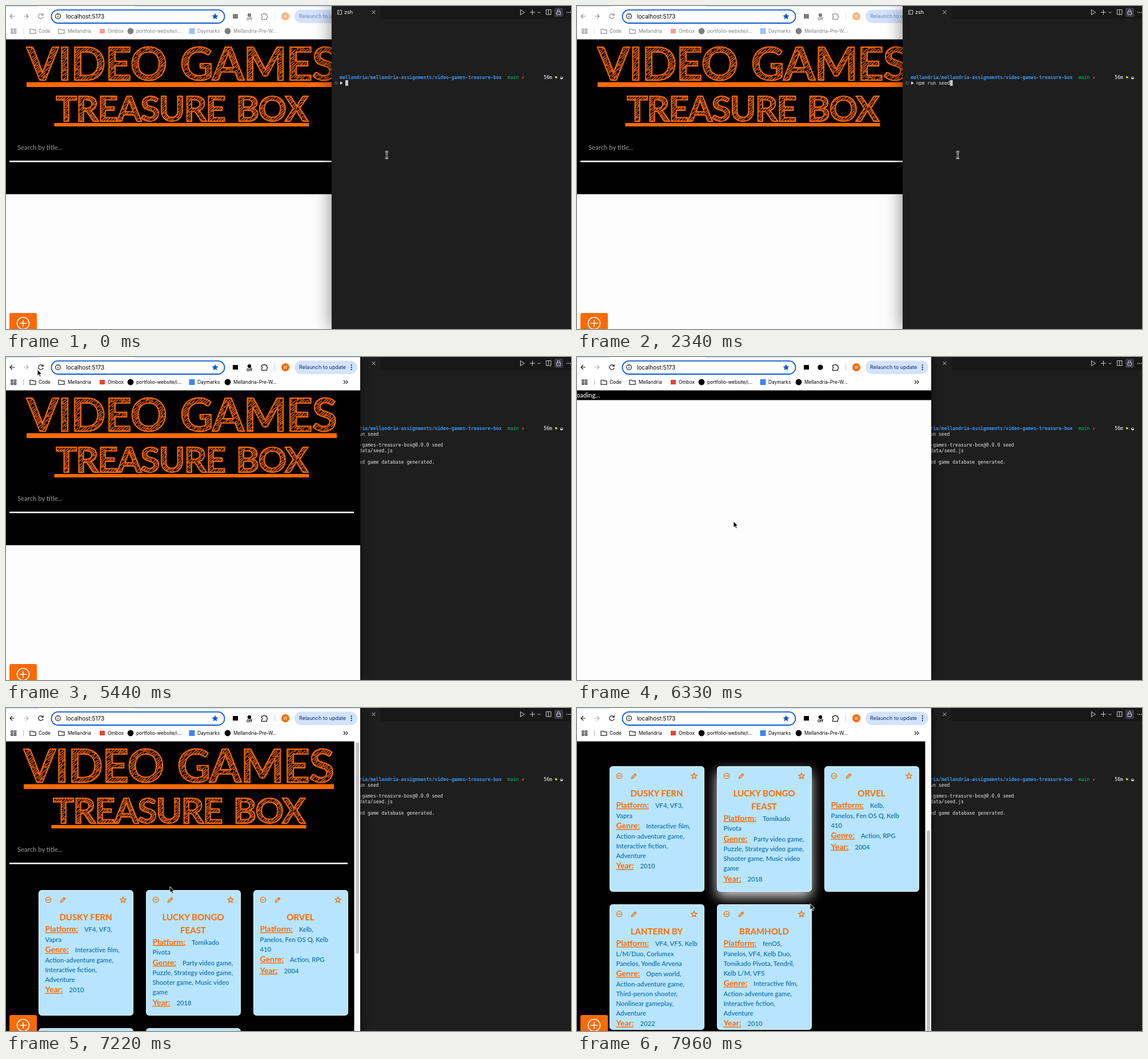
Write an HTML page that moves like this. It is 989 px wide and 566 px high and loops after 8 s.

```html
<!DOCTYPE html>
<html lang="en">
<head>
<meta charset="utf-8">
<title>Video Games Treasure Box</title>
<style>
  html, body { margin: 0; width: 100%; height: 100%; overflow: hidden; background: #1e1e1e; }
  .stage { position: relative; width: 989px; height: 566px; overflow: hidden; }
  svg { position: absolute; top: 0; }
  text { white-space: pre; }
  #web { left: 0; background: #fff; font: 8.3px Inter, sans-serif; color: #1f1f1f; z-index: 1; }
  #term { left: 570px; background: #1e1e1e; box-shadow: 0 0 30px rgba(0, 0, 0, .5); z-index: 2;
          font: 8.134px "DejaVu Sans Mono", monospace; fill: #e5e5e5; }
  #mouse { left: 0; z-index: 4; }
  .front #web { z-index: 3; box-shadow: 0 0 14px rgba(0, 0, 0, .5); }
  .dim { opacity: .5; }
  .front .dim { opacity: 1; }
  .front .off-state { opacity: .35; }
  .line { fill: none; stroke: currentColor; stroke-width: 1.2; }
  .ui { fill: none; stroke: #ccc; stroke-width: 1; }
  .page { font: 500 11.3px Lato, sans-serif; }
  .sketch { font-weight: 700; text-anchor: middle; fill: url(#hatch); stroke: #ff6a00; stroke-width: 2; }
  .orange { fill: #ff6a00; }
  .edge { fill: none; stroke: #ff6a00; stroke-width: 1.4; }
  .card { fill: #b7e5ff; stroke: #e9f7ff; }
  .glow { fill: #b7e5ff; filter: drop-shadow(0 10px 11px #fff); }
  .name { font-size: 15px; font-weight: 700; text-anchor: middle; fill: #ff6a00; }
  .label { font-size: 14px; font-weight: 700; fill: #ff6a00; text-decoration: underline; }
  .info { fill: #0767a8; }
</style>
</head>
<body>
<div class="stage" id="stage">

  <svg id="web" width="620" height="566">
    <defs>
      <pattern id="hatch" width="17" height="13" patternUnits="userSpaceOnUse" patternTransform="rotate(-40)">
        <path d="M0 1.2h17M0 4.600l12-.8M2 7.100l15 .4M0 9.300h9M6 11.400l11-.5" stroke="#ff6a00" stroke-width="1.5"/>
      </pattern>
      <clipPath id="view"><path d="M0 58h620v508H0z"/></clipPath>
      <path id="folder" class="line" d="M-5-3.5h4l1.2 1.3H5v6.3H-5z"/>
      <g id="tools" class="edge">
        <circle cx="17" cy="17" r="4.6"/><path d="M14.5 17h5"/>
        <path d="M38.5 21.5l.8-2.8 5.4-5.4 2 2-5.4 5.4zM43.4 14.6l2 2"/>
      </g>
    </defs>

    <path fill="#d3e3fd" d="M0 0h57v1.5H0zM226 0h394v1.5H226z"/>
    <rect x="79.5" y="6.8" width="303" height="23.2" rx="11.6" fill="#fff" stroke="#0b57d0" stroke-width="1.8"/>
    <circle class="line" cx="91" cy="18" r="4.4"/>
    <path class="line" d="M91 17.3v3M91 15v1.2"/>
    <text x="105" y="21.8" font-size="10">localhost:5173</text>
    <polygon id="fav" fill="#0b57d0"/>

    <g class="dim">
      <path class="line" d="M15 18H7M11 14l-4 4 4 4M64.3 15.3A4.2 4.2 0 1 0 65 19M65.2 13v3.2H62"/>
      <path class="line off-state" d="M31 18h8M35 14l4 4-4 4"/>
      <path d="M397 14h9v8h-9z"/>
      <circle id="ext" cx="426"/>
      <text id="badge" x="426" y="25.3" font-size="6.6" font-weight="700" text-anchor="middle">Off</text>
      <path class="line" d="M447.5 14.3h3a1.5 1.5 0 0 1 3 0h3v3a1.5 1.5 0 0 1 0 3v3h-9v-3a1.5 1.5 0 0 0 0-3z"/>
      <path d="M470 12.5h1v11h-1z" fill="#a8c7fa"/>
      <circle cx="489" cy="18" r="7" fill="#ef6c00"/>
      <text x="489" y="20.6" font-size="7" text-anchor="middle" fill="#fff">W</text>
    </g>
    <rect x="505" y="6.5" width="110" height="23.5" rx="11.7" fill="#d3e3fd"/>
    <g class="dim">
      <text x="513" y="21.3" font-size="9" fill="#0a2a66">Relaunch to update</text>
      <path d="M603.7 13.2h2v2h-2zm0 3.8h2v2h-2zm0 3.8h2v2h-2z" fill="#0a2a66"/>
      <path class="line" d="M9 40h3v3H9zM14.5 40h3v3h-3zM9 45.2h3v3H9zM14.5 45.2h3v3h-3z"/>
      <path d="M30 39h1v10h-1z" fill="#bbb"/>
      <use href="#folder" x="47" y="44"/><text x="57" y="47">Code</text>
      <use href="#folder" x="97" y="44"/><text x="108" y="47">Mellandria</text>
      <path d="M164 40h9v8h-9z" fill="#ea4335"/><text x="178" y="47">Ombox</text>
      <circle cx="218" cy="44" r="5.4"/><text x="228" y="47">portfolio-website/i...</text>
      <path d="M320.5 39h10v10h-10z" fill="#4285f4"/><text x="335" y="47">Daymarks</text>
      <circle cx="388" cy="44" r="5.4"/><text x="398" y="47">Mellandria-Pre-W...</text>
      <path class="line" d="M591 41l3 3-3 3M595 41l3 3-3 3"/>
    </g>

    <g class="page" clip-path="url(#view)">
      <g id="site">
        <path d="M0 58.4h620V566H0z"/>
        <g id="scroll">
          <g id="titles">
            <text class="sketch" x="307.5" y="130" font-size="80" letter-spacing="-.9" word-spacing="5">VIDEO GAMES</text>
            <text class="sketch" x="307.5" y="202" font-size="61.5" letter-spacing="-1.6" word-spacing="6">TREASURE BOX</text>
            <path class="orange" d="M36 133.5h543v8.5H36zM84.5 205h446v6h-446z"/>
          </g>
          <text x="20" y="252" fill="#929292">Search by title...</text>
          <rect id="rule" x="6" y="271" height="2.6" fill="#fff"/>
          <g id="cards"></g>
        </g>
        <path id="blank" fill="#fdfdfd" d="M0 329.700h620v237H0z"/>
        <g id="bar">
          <path d="M609.5 58H620v508h-10.5z" fill="#fafafa"/>
          <rect id="thumb" x="612.3" width="5.8" height="370" rx="2.9" fill="#c1c1c1"/>
        </g>
        <rect class="orange" x="6" y="538" width="48" height="40" rx="3"/>
        <path fill="none" stroke="#fff" stroke-width="1.6" d="M19.5 556a10.5 10.5 0 1 0 21 0a10.5 10.5 0 1 0-21 0M24 556h12M30 550v12"/>
      </g>
      <g id="loading">
        <path fill="#fdfdfd" d="M0 58h620v508H0z"/>
        <path d="M0 58.4h620v17H0z"/>
        <text x="-6.5" y="70.5" fill="#fff">Loading...</text>
      </g>
    </g>
  </svg>

  <svg id="term" width="419" height="566" viewBox="570 0 419 566">
    <path fill="#181818" d="M655 0h334v23H655z"/>
    <path class="ui" d="M580.5 7.5h7v7h-7zM582 9.5l1.6 1.5-1.6 1.5M640.5 8l6 6M646.5 8l-6 6"/>
    <text id="tab" x="592" y="14.3" font-family="Inter, sans-serif" font-size="9" fill="#fff"></text>
    <rect x="960" y="3" width="15" height="16" rx="3" fill="#3a3a46"/>
    <path class="ui" d="M900.5 6.5l7 4.5-7 4.5zM917 11h9M921.5 6.5v9M930.5 10l2.5 2.5 2.5-2.5M945.5 6.5h8.5v8.5h-8.5zM949.7 6.5v8.5M964 10h6.5v5H964zM965.3 10V8.3a2 2 0 0 1 4 0V10"/>
    <path fill="#ccc" d="M981 10.5h1.5V12H981zm3 0h1.5V12H984zm3 0h1.5V12H987z"/>

    <text x="584" y="128" font-weight="700" fill="#3b96ee">mellandria/mellandria-assignments/video-games-treasure-box</text>
    <text x="877.8" y="128" fill="#0dbc79">main</text>
    <text x="902.3" y="128" fill="#f14c4c">✗</text>
    <text x="941.3" y="128" fill="#fff">56m</text>
    <text x="960.5" y="128" fill="#e5e510">⚑</text>
    <text x="970" y="128" fill="#fff">◒</text>
    <circle cx="578" cy="135" r="2.3" fill="none" stroke="#6a6a6a"/>
    <path d="M585 132l4.5 3-4.5 3z"/>
    <text id="typed" x="593.8" y="137.8"></text>
    <g id="run">
      <text x="584" y="157.4">&gt; video-games-treasure-box@0.0.0 seed</text>
      <text x="584" y="167.2">&gt; node data/seed.js</text>
    </g>
    <text id="done" x="584" y="186.8">Mock seed game database generated.</text>
    <rect id="caret" width="4.9" height="9.8" fill="#ccc"/>
  </svg>

  <svg id="mouse" width="989" height="566">
    <defs>
      <path id="bar-shape" fill="none" d="M-2.8-5.8q2.8 0 2.8 1.600q0-1.600 2.800-1.600M0-4.300v8.600M-2.800 5.800q2.800 0 2.800-1.600q0 1.600 2.800 1.600M-1.600 1.800h3.200"/>
    </defs>
    <path id="arrow" d="M0 0v10.8l2.5-2.3 1.7 3.9 1.9-.8-1.7-3.8h3.4z" fill="#000" stroke="#fff" stroke-width=".9"/>
    <g id="beam">
      <use href="#bar-shape" stroke="#fff" stroke-width="2.6"/>
      <use href="#bar-shape" stroke="#000" stroke-width="1"/>
    </g>
  </svg>
</div>

<script>
const LOOP = 8000, CELL = 4.897, COMMAND = 'npm run seed';
const FOCUS = 4570, RELOAD = 6330, LOADED = 6480;
const $ = id => document.getElementById(id);

// Card text: a "Label:" prefix starts a new field, other lines continue it.
const games = [
  { x: 57, y: 319, name: ['DUSKY FERN'], lines: ['Platform:VF4, VF3,', 'Vapra',
    'Genre:Interactive film,', 'Action-adventure game,', 'Interactive fiction,', 'Adventure', 'Year:2010'] },
  { x: 245, y: 319, name: ['LUCKY BONGO', 'FEAST'], lines: ['Platform:Tomikado', 'Pivota',
    'Genre:Party video game,', 'Puzzle, Strategy video game,', 'Shooter game, Music video', 'game', 'Year:2018'] },
  { x: 433, y: 319, name: ['ORVEL'], lines: ['Platform:Kelb,', 'Panelos, Fen OS Q, Kelb', '410',
    'Genre:Action, RPG', 'Year:2004'] },
  { x: 57, y: 561, name: ['LANTERN BY'], lines: ['Platform:VF4, VF5, Kelb', 'L/M/Duo, Corlumex',
    'Panelos, Yondle Arvena', 'Genre:Open world,', 'Action-adventure game,', 'Third-person shooter,',
    'Nonlinear gameplay,', 'Adventure', 'Year:2022'] },
  { x: 245, y: 561, name: ['BRAMHOLD'], lines: ['Platform:fenOS,', 'Panelos, VF4, Kelb Duo,',
    'Tomikado Pivota, Tendril,', 'Kelb L/M, VF5', 'Genre:Interactive film,', 'Action-adventure game,',
    'Interactive fiction,', 'Adventure', 'Year:2010'] }
];

function star(cx, cy, r) {
  return Array.from({ length: 10 }, (_, i) => {
    const a = i * Math.PI / 5 - Math.PI / 2, d = i % 2 ? r * .45 : r;
    return (cx + d * Math.cos(a)).toFixed(2) + ',' + (cy + d * Math.sin(a)).toFixed(2);
  }).join(' ');
}

function cardMarkup({ x, y, name, lines }, i) {
  const box = 'width="165" height="219" rx="5"';
  let out = i === 1 ? `<rect id="glow" class="glow" ${box}/>` : '';
  out += `<rect class="card" x=".5" y=".5" ${box}/><use href="#tools"/>
    <polygon class="edge" points="${star(148, 17.3, 5.3)}"/>`;
  name.forEach((s, n) => out += `<text class="name" x="82.5" y="${53 + n * 22.5}">${s}</text>`);
  let top = 73 + (name.length - 1) * 22.5, wasLabel = null;
  for (const line of lines) {
    const [, label, rest] = line.match(/^(\w+:)?(.*)$/);
    if (wasLabel !== null) top += label ? (wasLabel ? 19.5 : 18.7) : (wasLabel ? 17.5 : 17);
    wasLabel = !!label;
    out += `<text class="info" x="11.5" y="${top}">` +
      (label ? `<tspan class="label">${label}</tspan><tspan dx="11">${rest}</tspan>` : rest) + '</text>';
  }
  return `<g transform="translate(${x} ${y})">${out}</g>`;
}

$('fav').setAttribute('points', star(366, 18.5, 6));
$('cards').innerHTML = games.map(cardMarkup).join('');

// Held values: each row starts at its time in ms.
const keys = [540, 690, 840, 980, 1270, 1420, 1580, 1740, 1890, 1890, 2190, 2340];
const path = [
  [0, 666.5, 261], [3980, 640, 264], [4130, 560, 268], [4280, 460, 266], [4420, 410, 262],
  [4710, 360, 225], [4860, 265, 160], [5000, 150, 88], [5150, 78, 38], [5300, 60, 26],
  [5440, 55, 22], [5590, 59, 18], [5880, 95, 66], [6030, 185, 180], [6180, 255, 258],
  [6330, 274, 288], [6930, 281, 301], [7080, 287, 313], [7230, 290, 319],
  [7820, 345, 330], [7960, 408, 343]
];
const scrolls = [[0, 0], [7230, 6], [7370, 24], [7520, 217]];
const glows = [[0, 0], [7230, .4], [7370, 1], [7960, .85]];
const carets = [[0, 0], [3080, 1], [3530, 4], [3680, 6]];

const at = (rows, t) => rows.filter(r => r[0] <= t).pop().slice(1);
const show = (id, on) => $(id).style.display = on ? '' : 'none';
const move = (id, x, y) => $(id).setAttribute('transform', `translate(${x} ${y})`);

function draw(t) {
  const typed = keys.filter(k => k <= t).length;
  const [row] = at(carets, t);
  $('typed').textContent = COMMAND.slice(0, typed);
  move('caret', row ? 584 : 594 + typed * CELL, 130 + row * 9.8);
  $('tab').textContent = t < 3230 ? 'zsh' : 'node';
  show('run', t >= 3530);
  show('done', t >= 3680);

  const loaded = t >= LOADED, loading = t >= RELOAD && !loaded;
  const [scroll] = at(scrolls, t);
  $('stage').classList.toggle('front', t >= FOCUS);
  show('loading', loading);
  show('site', !loading);
  show('blank', !loaded);
  show('cards', loaded);
  show('bar', loaded);
  move('titles', loaded ? -5 : 0, 0);
  move('scroll', 0, -scroll);
  $('rule').setAttribute('width', loaded ? 592 : 603);
  $('thumb').setAttribute('y', 60.5 + scroll * .71);
  $('glow').style.opacity = at(glows, t)[0];

  const badge = t < 5880 || t >= 6630;
  show('badge', badge);
  $('ext').setAttribute('cy', badge ? 16 : 18);
  $('ext').setAttribute('r', badge ? 3.2 : 4.6);

  const [x, y] = at(path, t);
  show('beam', x >= 570);
  show('arrow', x < 570);
  move(x < 570 ? 'arrow' : 'beam', x, y);
}

function tick() {
  draw(performance.now() % LOOP);
  requestAnimationFrame(tick);
}
tick();
</script>
</body>
</html>
```
